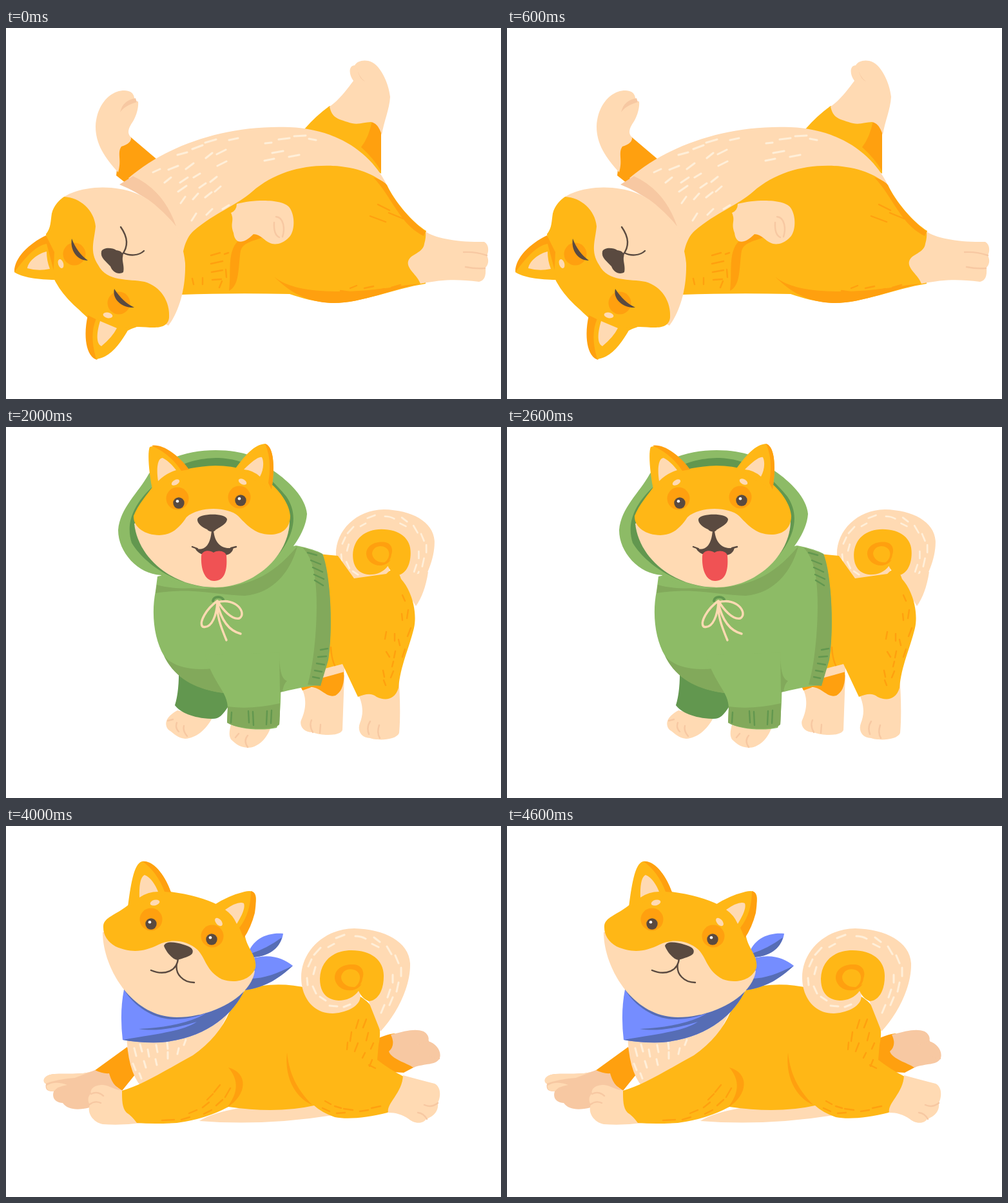
An HTML page for the animation above (5000 ms loop, 768x576 px).

```html
<!DOCTYPE html>
<html lang="en">
<head>
<meta charset="utf-8">
<title>Shiba stickers</title>
<style>
html,body{margin:0;width:100%;height:100%;overflow:hidden;background:#fff}
svg{display:block;width:100vw;height:100vh}
.y{fill:#ffb716}.o{fill:#ffa00f}.c{fill:#ffdab3}.p{fill:#f7c8a2}.d{fill:#5a4a40}
.g{fill:#8dbb66}.m{fill:#82a95b}.k{fill:#62974f}
.r{fill:#f05254}.l{fill:#ff5a5a}.n{fill:#cc4648}
.b{fill:#758dff}.v{fill:#566db5}
.s{fill:none;stroke-width:2.4;stroke-linecap:round;stroke-linejoin:round}
.so{stroke:#ffa00f}.sw{stroke:#ffefd9;stroke-width:3}.sd{stroke:#5a4a40}.sp{stroke:#f7c8a2}.sk{stroke:#62974f}.sn{stroke:#cc4648}.sc{stroke:#ffdab3}
</style>
</head>
<body>
<svg viewBox="0 0 768 576">
<defs>
<circle id="blush" class="o" r="17.5"/>
<ellipse id="brow" class="c" rx="7.5" ry="4.3"/>
<g id="eye"><circle class="d" r="8.7"/><circle cx="-2" cy="-2.8" r="2.3" fill="#fff"/></g>
<g id="tail">
<path class="c" d="M581 319C606 292 628 250 627 213C625 180 588 160 540 159C492 160 457 196 458 237C459 270 480 292 508 291C536 289 556 274 548 257L562 271Z"/>
<path class="y" d="M547 256C540 266 528 271 516 271C497 270 487 258 487 237C488 209 508 193 536 193C567 193 587 209 586 234C586 255 577 271 563 272C555 269 550 263 547 256"/>
<path class="o" d="M552 245C541 263 512 256 510 236C510 221 524 214 540 215C552 216 557 226 553 237C552 245 547 251 540 253Z"/>
<path class="y" d="M541 250C530 251 520 244 520 234C522 223 534 219 544 225C553 232 549 245 541 250"/>
<path class="s sw" d="M512 174l13-5M542 171q9 0 16 4M488 189l-10 11M509 183l-9 5M474 207l-5 11M480 219l-3 11M467 236l1 11M476 249l5 11M487 265l9 6M502 279l12 1M524 281l10-4M571 173l9 7M568 183l10 5M591 187l7 12M604 201l5 12M613 220l0 13M600 231l0 12M609 243l-3 14M596 254l-4 12M600 266l-5 12M587 278l-5 12"/>
</g>
</defs>

<g class="pose">
<path class="y" d="M463 157Q480 137 502 121L540 130L582 152V226Q520 195 463 157"/>
<path class="o" d="M568 144L582 150V222Q570 202 551 185Q563 170 568 144"/>
<path class="c" d="M502 122C517 112 530 94 539 82C531 71 532 58 541 58C544 52 553 49 562 51C580 54 594 86 596 107C595 126 586 146 583 166Q577 147 566 146C555 146 545 152 530 146C515 141 506 140 502 122"/>
<path class="p" d="M544 59Q546 75 557 83Q547 79 544 59"/>
<path class="o" d="M193 169L233 203L190 244L171 229L176 184Z"/>
<path class="c" d="M194 170C187 163 190 155 197 145C203 135 206 122 205 114Q199 114 199 108C197 97 185 95 172 99C155 105 140 125 139 153C139 180 153 201 174 224C180 205 172 194 179 184Q195 179 194 170"/>
<path class="p" d="M201 109C188 111 180 118 177 131Q183 121 203 115Z"/>
<path class="c" d="M190 233C250 182 340 150 440 154C516 157 568 196 591 244L400 320L260 350L215 260Z"/>
<path class="p" d="M176 243L197 230Q245 252 264 308Q230 265 176 243"/>
<path class="y" d="M272 414C269 365 274 330 291 315C325 286 357 276 382 254C420 221 470 210 520 215C557 219 580 234 591 244C605 272 631 302 652 315L651 397C600 405 550 428 505 427C480 425 460 420 440 413Q350 411 272 414"/>
<path class="o" d="M570 232Q586 237 591 244C602 270 630 301 651 316L648 323C610 304 600 264 570 232M416 386C438 405 480 410 530 409C580 407 610 400 642 397C600 405 550 428 505 427C465 425 440 410 416 386M346 408C349 382 345 360 352 343C360 322 384 315 400 324C385 331 368 332 364 346C360 370 363 400 346 408"/>
<path class="c" d="M651 316C665 326 700 333 742 332C750 336 749 349 746 353C750 361 748 368 744 372C745 386 742 392 734 394C700 390 680 390 643 397C638 383 621 374 624 362C628 350 647 350 649 335Q652 325 651 316"/>
<path class="s sp" d="M746 353Q728 347 710 348M743 373Q728 374 713 371"/>
<path class="c" d="M358 273C385 266 430 265 440 279C449 292 448 315 440 324C428 338 414 336 410 334C400 330 395 320 384 320C367 337 355 335 353 318C347 302 355 300 349 287Q358 283 358 273"/>
<path class="s sp" d="M419 293C431 294 433 312 429 324M416 302Q415 321 424 325"/>
<path class="s so" d="M318 353l14-4M318 366l18-4M319 379l17-3M320 391l14-1M289 389l2 9M305 388l0 10M339 351l6-2M341 375l1 12M335 393l-4 10M565 292l24 9M577 274l18 9M594 287l22 9M544 400l-10 4M570 401l-14 3M533 410l-14-2M558 410l-15 2M587 405l-15 5M612 399l-14 4"/>
<path class="s sw" d="M266 197l15-4M289 188l16-6M309 178l17-5M346 174l14-3M252 220l15-6M279 219l12-9M310 202l10-8M327 196l14-7M228 224l11-5M246 240l10-8M270 240l12-8M291 232l10-6M328 214l14-7M267 254l13-9M300 248l10-7M317 239l10-8M271 272l7-10M290 266l8-9M309 263l10-8M324 254l9-8M288 299l7-11M311 290l9-9M336 281l10-6M401 206l15-3M413 194l17-3M423 173l17-2M447 168l18-1M402 179l10-1M439 200l16-3M470 172l11 2"/>
<path class="c" d="M90 262C125 241 185 243 220 266C255 290 275 330 278 365C279 406 268 440 252 462L170 420L110 330Z"/>
<path class="y" d="M62 320C70 310 69 300 71 288C74 275 83 267 90 262C115 263 137 283 139 308C137 330 129 347 143 368C157 395 190 389 215 394C240 401 255 425 253 450C250 472 220 463 203 464C186 470 170 479 170 479C146 468 124 448 114 438Q75 405 66 366Z"/>
<path class="o" d="M62 322C35 335 12 358 13 379L73 391L75 348ZM127 446C120 475 123 510 141 515L178 471Z"/>
<path class="y" d="M13 379C27 361 43 339 63 335L78 391C50 391 24 387 13 379M140 514C133 490 132 470 140 451L191 466C177 491 161 512 140 514"/>
<path class="c" d="M63 347C50 350 35 361 33 373Q50 378 68 374Q63 361 63 347M146 455C140 475 140 490 148 494Q165 480 172 466Z"/>
<use href="#blush" x="106" y="351"/><use href="#blush" x="175" y="427"/>
<path class="d" d="M102 327C99 345 110 361 127 361C115 352 108 342 102 327M168 405C164 421 180 435 199 434C187 428 177 419 168 405M148 347C151 340 165 341 171 345C179 346 183 350 181 356C180 362 184 371 182 379C175 384 165 379 162 370C155 362 146 357 148 347"/>
<path class="s sd" d="M180 352Q195 333 178 309M182 349C191 354 206 354 214 346"/>
<use href="#brow" transform="translate(85 366)rotate(72)scale(.95)"/><use href="#brow" transform="translate(158 446)rotate(12)"/>
</g>

<g class="pose">
<path class="c" d="M622 346C612 390 580 420 545 430L550 395Q600 375 622 346"/>
<path class="y" d="M441 262C470 210 500 155 547 140L655 148C690 172 716 208 718 255C718 310 712 360 706 395Q665 410 645 391L614 346C597 374 576 385 555 393C560 430 530 475 510 488Q470 485 424 481L445 420Z"/>
<path class="o" d="M459 296Q489 299 495 318C499 362 490 390 468 408L487 340ZM607 236C594 265 599 322 614 347C602 312 602 270 607 236M540 348C560 357 567 379 558 395C556 374 552 363 540 348"/>
<path class="c" d="M645 391C660 377 680 395 694 396Q703 388 707 368L704 445C700 453 678 455 667 452C655 450 645 442 646 434C650 415 650 405 645 391M424 481C450 495 490 467 511 487C480 515 440 540 410 551C400 553 390 550 390 545C380 548 370 545 372 538C360 538 355 530 360 522C365 512 380 510 400 507Q412 492 424 481"/>
<path class="y" d="M266 465Q285 452 296 443L390 470Q360 488 325 498Z"/>
<path class="c" d="M266 463C275 476 290 490 310 487Q325 485 327 497C300 510 265 518 240 521C228 520 225 513 228 510C215 514 207 508 210 503C196 502 193 490 200 484C212 478 225 480 240 476Q255 467 266 463"/>
<path class="s sp" d="M228 510Q234 499 243 497M210 503Q215 490 225 487M372 538Q378 524 388 520M391 545Q397 525 412 517M659 442Q657 432 662 424M674 452Q669 443 674 434"/>
<path class="s so" d="M517 187l10-10M534 170l9-10M487 208l8-10M500 212l8-11M471 223l8-10M460 242l5-8M544 173l8-6M546 152l11-5M688 205l6 11M698 211l4 10M689 234l6 7M700 246l4 9M690 262l6 8M690 290l3 8M703 315l-2 12M688 322l2 11M699 345l-4 14M690 373l5-9M546 385l-7 10M546 408l-5 12M532 402l-6 10M524 420l-8 11M534 442l-8 12M517 444l-8 11M500 440l-9 7M500 460l-10 7M480 465l-9 5M513 470l-9 7M340 464l-13-2M320 475l-14 0M355 476l-14 4"/>
<use href="#tail" transform="translate(108 -112)scale(.988)"/>
<path class="c" d="M243 385C250 432 300 466 380 471C440 473 488 400 489 332L350 320Z"/>
<path class="y" d="M243 385C245 368 255 357 258 345C270 320 285 300 301 291Q340 275 378 269Q410 262 440 278C470 290 487 305 488 330C480 360 460 362 440 361C420 360 405 344 385 341C350 337 340 355 325 380C305 410 285 412 265 408C250 405 242 396 243 385"/>
<path class="y" d="M236 280C237 268 255 267 268 272Q286 278 302 291L259 347C251 320 237 300 236 280M375 271C385 245 400 218 414 217C430 218 440 245 442 281Z"/>
<path class="o" d="M417 218C432 221 442 249 443 281L432 277Q434 245 417 218"/>
<path class="c" d="M267 324Q251 300 254 290C260 284 275 293 288 301Q275 310 267 324M393 267C400 246 408 236 414 240Q421 250 422 270Q405 262 393 267"/>
<use href="#blush" x="303" y="342"/><use href="#blush" x="400" y="312"/>
<path class="y" d="M282 365Q300 348 326 345L328 375H282ZM378 329Q398 317 423 320L423 336H378Z"/>
<path class="d" d="M288 362C291 345 311 339 326 345C310 347 300 351 288 362M382 327C390 310 411 307 422 320C405 318 395 320 382 327M343 364C343 355 365 348 378 348C392 348 390 360 385 366C376 374 370 379 362 375C350 375 343 370 343 364M334 410C350 414 371 404 373 372L376 372C375 400 410 402 424 383C430 405 420 425 408 434C390 442 370 441 355 432Q340 424 334 410"/>
<path class="r" d="M364 437C368 424 380 419 388 426C395 415 412 413 424 418C415 438 385 444 364 437"/>
<use href="#brow" transform="translate(293 319)rotate(-50)"/><use href="#brow" transform="translate(395 286)rotate(8)"/>
</g>

<g class="pose">
<path class="c" d="M457 403C470 410 500 400 525 385L522 470C520 480 490 480 476 474C460 474 455 462 458 455C465 440 468 420 457 403M543 408L609 385Q613 440 610 475C605 487 575 487 565 483C550 483 545 470 549 460C555 445 555 430 543 408"/>
<path class="o" d="M457 403L490 388L524 378C526 400 520 412 511 417C497 421 490 405 474 404L460 409"/>
<path class="c" d="M490 376L525 365V380L485 391Z"/>
<use href="#tail" transform="translate(97.4 -16)scale(.905)"/>
<path class="c" d="M608 234L655 225Q650 258 636 278Z"/>
<path class="y" d="M485 197L515 200L540 235L590 228Q605 212 613 236C631 256 638 290 633 312C625 345 612 370 609 405C603 425 587 425 575 419C566 412 557 415 546 419L522 368L495 375Z"/>
<use href="#tail" transform="translate(97.4 -16)scale(.905)" clip-path="path('M440 140H640V240L562 272L546 300H440Z')"/>
<path class="s so" d="M504 342Q505 360 510 370M615 261l4 9M624 284l-2 13M614 290l1 10M590 318l-2 11M603 321l0 11M628 312l-5 13M590 349l5 8M604 348l-2 10M619 345l-4 12M601 364l-2 8M585 378l2 10M601 379l-4 10M586 393l3 8M609 330l2 9"/>
<path class="c" d="M266 440L320 452C310 470 295 483 278 484C265 483 260 475 252 470C245 462 247 450 266 440M349 462L411 465C405 485 390 498 375 498C360 497 355 490 349 485C345 478 347 470 349 462"/>
<path class="s sp" d="M251 456l8-2M268 473Q262 467 265 459M281 480Q274 472 276 464M356 482l5-6M375 497Q368 487 375 479M476 474Q470 464 474 455M487 475l1-13M563 477Q559 466 565 457M580 483Q575 475 579 463"/>
<path class="k" d="M268 372L330 390L346 432C335 449 330 454 318 453C290 452 270 443 262 432Q269 410 268 372"/>
<path class="g" d="M235 232L380 200L450 184Q480 190 491 197C502 230 508 300 500 360L487 401Q470 401 430 411L338 413C300 408 262 392 245 355C230 330 225 290 232 255Z"/>
<path class="m" d="M460 187L491 197C503 225 508 310 500 362L488 402L468 400C480 360 485 280 480 240Q477 205 460 187M245 355C260 374 290 378 320 375L338 413C300 408 265 395 245 355"/>
<path class="g" d="M309 354C322 400 344 410 344 437L343 459C360 470 400 472 420 467C428 455 428 380 423 350Z"/>
<path class="m" d="M424 349C424 375 427 392 436 394Q430 400 429 411L425 412ZM344 434Q380 439 425 429C425 445 425 455 424 462C415 472 360 470 343 459Z"/>
<path class="s sk" d="M376 441l1 18M383 442l1 21M405 441l-1 21M412 440l-1 20M350 443l-1 16M468 195l14 4M473 207l15 6M476 218l15 7M478 229l15 7M479 238l13 8M488 346l11-2M484 357l13-1M482 367l12 2M479 378l11 2M476 388l10 2"/>
<path class="m" d="M234 245C270 255 300 248 325 250C370 247 410 236 452 185C440 230 410 259 370 262C320 260 290 249 232 258"/>
<path class="g" d="M222 72C250 45 290 36 325 36C370 36 395 48 415 68C440 85 465 110 467 135C465 165 440 195 420 215C395 235 365 247 325 249C290 256 260 244 240 230C205 228 174 195 174 160C177 125 205 103 222 72"/>
<path class="k" d="M228 92C260 55 300 48 330 48C370 50 400 65 435 108C450 130 449 155 435 180C415 215 385 235 325 249C270 249 217 216 195 180C187 155 192 125 228 92"/>
<path class="c" d="M199 150C205 205 260 249 325 249C385 249 440 200 440 145L320 100Z"/>
<path class="y" d="M198 138C205 120 219 105 228 92Q260 62 325 60Q375 60 411 88C425 100 440 120 441 138C441 160 425 167 410 167C385 167 372 150 360 138C345 124 300 122 280 140C270 155 258 168 238 168C215 168 197 155 198 138"/>
<path class="y" d="M228 101C222 75 219 40 223 31C238 25 270 45 283 66ZM355 66C370 45 385 27 402 26C415 30 418 60 412 97Z"/>
<path class="o" d="M226 29C244 25 271 47 284 66L272 68Q255 42 226 29M402 26C415 30 418 60 412 97L407 87Q413 50 402 26"/>
<path class="c" d="M236 84C233 65 235 48 243 48C252 52 260 62 264 67Q248 72 236 84M369 66C380 55 392 45 397 47C401 55 399 68 394 77Q383 67 369 66"/>
<use href="#blush" x="266" y="111"/><use href="#blush" x="362" y="109"/><use href="#eye" x="268" y="118"/><use href="#eye" x="364" y="114"/>
<use href="#brow" transform="translate(263 86)rotate(-30)scale(.9)"/><use href="#brow" transform="translate(367 85)rotate(28)scale(.9)"/>
<path class="d" d="M297 143C300 134 340 133 343 143C343 151 330 156 325 160C322 164 315 163 312 159C305 156 296 150 297 143M293 188C303 192 317 190 319 160L322 160C324 188 343 190 353 187C351 199 340 200 330 200L308 199Q297 196 293 188"/>
<path class="s sd" d="M289 186l8 3M357 186l-8 2"/>
<path class="r" d="M303 200C304 192 315 190 322 195C330 190 341 193 342 200C344 225 338 239 323 239C308 239 302 220 303 200"/>
<path class="s sk" style="stroke-width:4" d="M321 270C322 262 336 262 338 270"/>
<path class="s sc" style="stroke-width:3.4" d="M328 272C358 264 374 290 362 297C350 300 336 283 328 270C311 282 299 303 305 310C320 314 327 290 328 271C326 295 336 316 342 331M328 274C334 300 345 316 364 321"/>
</g>

<g class="pose">
<path class="p" d="M103 380C80 375 52 378 45 385C38 400 27 412 26 420C26 430 35 435 45 432C60 430 70 430 76 433L110 412Z"/>
<path class="o" d="M92 378L118 379L130 420L88 442L72 433C85 420 107 412 104 400Q99 386 92 378M506 322Q525 315 540 309L565 360Q535 380 506 391Z"/>
<path class="y" d="M125 325L165 320L205 288Q240 276 290 268L295 486Q250 487 218 484C195 500 160 499 119 499L90 455Q95 440 125 420C115 390 110 350 125 325"/>
<path class="o" d="M262 400C256 440 238 468 218 484L292 485L286 470C260 473 245 470 237 469C253 445 262 420 262 400"/>
<path class="o" d="M119 383Q116 408 126 415L122 426L113 400Z"/>
<path class="c" d="M95 441C80 455 50 465 40 472C35 480 38 490 42 497C38 505 42 515 52 516C60 525 75 523 83 515C95 503 108 500 119 498C122 480 105 470 93 463C90 455 92 448 95 441"/>
<path class="s sp" d="M42 498Q48 491 55 490M54 516Q57 503 64 499M73 519Q76 510 72 503"/>
<path class="s so" d="M127 357l-4 9M139 352l-5 16M129 377l-4 12M141 381l-4 14M157 380l-2 12M129 401l2 9M143 404l4 9M133 424l-2 10M151 425l-1 12M211 461l-13 6M237 461l-11 9M223 471l-13 9M206 477l-10 8M178 489l-14-2M153 493l-8 0M237 447l-8 5"/>
<use href="#tail" transform="translate(681 48)scale(-1 1)"/>
<path class="p" d="M532 309C550 310 560 295 565 285C575 270 590 258 600 260C610 262 610 270 606 275C615 278 620 288 617 295C615 302 612 303 613 310C610 325 575 340 562 358C550 350 531 345 530 335Q540 325 532 309"/>
<path class="c" d="M565 290C575 270 590 258 600 260C610 262 610 270 606 275Q584 278 568 295ZM577 297Q594 281 612 281C622 289 617 296 612 299Q595 291 577 297"/>
<path class="r" d="M279 270L320 265L497 285C510 320 512 360 510 401L430 474Q370 499 290 492C262 440 250 360 279 270"/>
<path class="n" d="M262 383C285 410 310 434 345 434L410 472C380 495 330 495 290 492Q268 450 262 383M300 277C280 300 269 340 277 400L280 408C277 350 285 310 300 277M510 375C501 390 482 393 463 387L510 402ZM418 320C455 320 480 310 497 288L500 293C485 318 455 330 418 320M433 332Q475 340 501 305Q485 345 433 332"/>
<path class="y" d="M462 388L525 404C531 430 521 450 511 458Q470 468 405 472L420 420Z"/>
<path class="o" d="M436 411L433 440L440 468L406 472Q410 440 436 411"/>
<path class="l" d="M315 365C318 335 345 322 365 322C400 325 440 360 472 385Q445 388 430 410C415 435 410 455 407 473L395 472C370 465 330 430 320 405Q314 385 315 365"/>
<path class="n" d="M314 362C316 400 345 435 382 467C345 450 306 410 314 362M436 398Q399 425 382 469L388 471Q400 428 436 398M467 386Q414 405 394 471L407 473Q415 410 467 386"/>
<path class="l" d="M456 389Q417 417 401 471L407 473Q417 411 456 389"/>
<path class="c" d="M524 404C540 402 548 390 558 392C566 390 566 400 564 402C575 402 580 412 577 420C580 430 572 435 568 438C560 452 535 458 510 458C510 440 530 430 526 418Z"/>
<path class="s sp" d="M564 402Q553 402 549 408M577 420Q566 419 558 422"/>
<path class="s so" d="M440 440l12-6M456 437l13 2M476 438l13-2M495 436l8-3M440 451l13-2M460 455l14-3M480 454l12-2M446 462l11-3M495 449l9-3"/>
<path class="c" d="M310 264C330 300 370 318 415 318C480 318 535 260 535 175L430 160Z"/>
<path class="y" d="M302 245C305 230 312 222 313 210Q315 180 325 165Q345 153 380 137Q430 119 465 122Q490 130 497 143C520 150 534 160 534 178C525 205 500 210 480 209C455 205 445 195 420 193C390 199 385 210 378 230C370 255 355 268 335 268C315 266 302 257 302 245"/>
<path class="y" d="M294 160C290 130 305 128 320 134Q345 140 362 150L320 198Q300 185 294 160M424 124C432 98 448 72 465 72C480 75 485 110 492 139Z"/>
<path class="o" d="M296 137C290 150 297 175 315 200L321 188Q300 165 296 137M424 124C432 98 448 72 462 72Q446 92 441 122Z"/>
<path class="c" d="M318 177Q307 155 311 147C318 145 330 150 343 158Q327 163 318 177M445 122C448 105 455 93 462 94C468 98 472 115 473 128Q458 118 445 122"/>
<use href="#blush" x="364" y="196"/><use href="#blush" x="457" y="164"/>
<path class="y" d="M441 179Q460 167 480 168V186H441Z"/>
<use href="#eye" x="366" y="201"/>
<path class="d" d="M443 177C446 161 468 156 480 168C465 168 456 171 452 176L468 179Q455 181 443 178M398 217C400 205 428 198 438 201C443 208 440 215 434 219C428 226 420 226 415 229C405 231 396 225 398 217M403 258C430 257 455 245 466 222C470 250 460 275 435 276C420 277 408 268 403 258"/>
<path class="r" d="M433 274C430 262 442 256 453 262C460 252 465 250 472 256C482 262 488 272 486 280C483 289 470 288 463 280C455 274 445 277 433 274"/>
<path class="s sn" d="M455 264q11 2 14 8"/>
<use href="#brow" transform="translate(353 174)rotate(-50)scale(.9)"/><use href="#brow" transform="translate(451 138)rotate(8)"/>
</g>

<g class="pose">
<path class="o" d="M560 337Q590 323 603 322L634 374L617 383L560 380ZM137 380L188 343L205 380L180 411Z"/>
<path class="p" d="M597 324C620 318 635 314 648 319C655 323 657 330 655 334C668 338 676 350 673 360C668 372 650 368 632 375C620 367 598 362 594 350Q605 340 597 324M138 379C120 387 100 384 75 385C60 386 55 395 62 400C60 410 65 412 74 412C70 425 80 430 88 430C95 440 110 442 130 437L181 411C168 405 163 395 160 384Q150 385 138 379"/>
<path class="c" d="M138 379C120 387 100 384 75 385C60 386 55 395 61 400Q80 393 107 391ZM63 403Q76 395 95 402Q80 404 74 412Q62 412 63 403"/>
<path class="c" d="M187 320L355 270L310 360L210 405Q188 380 187 320M300 458Q340 432 480 428L507 449Q400 466 300 458"/>
<path class="c" d="M195 410C165 413 165 402 147 402C135 403 130 410 132 415C126 420 127 428 130 433C125 445 135 460 150 463Q180 465 210 461Z"/>
<path class="y" d="M347 288Q360 270 372 253Q420 240 470 252L550 265C575 280 585 310 578 340L576 363Q595 378 617 389C615 425 605 435 592 445C560 453 530 456 510 452Q490 445 478 434Q420 447 345 436Q310 455 265 461Q230 463 203 461Q195 450 187 445C180 438 180 425 180 411C210 403 250 378 290 356Q330 328 347 288"/>
<path class="o" d="M345 375C376 383 375 417 343 437C360 415 362 395 345 375M436 352C440 390 455 412 475 433C445 420 432 385 436 352"/>
<path class="c" d="M616 387Q645 395 665 400C675 405 675 420 670 430C672 445 660 452 652 455C645 465 630 460 625 455C615 448 605 445 593 445C590 430 615 415 616 387"/>
<path class="s sp" d="M132 416Q142 411 151 419M130 432Q138 426 147 430M670 430Q660 438 649 433M653 455Q648 446 639 445M655 334l-15 5M672 361q-9 1-15-5"/>
<path class="s so" d="M547 301l-4 13M559 300l-5 13M536 320l-2 14M562 321l-3 12M530 336l-1 11M546 337l-5 13M557 352l-4 8M570 337l-4 9M568 363l-4 10M573 376l-10-5M332 402l-9 11M348 407l-8 14M321 416l-9 9M336 425l-10 9M315 429l-10 8M296 441l-12 5M319 441l-12 6M285 452l-13 4M261 456l-19 1M495 427l9 5M510 435l10 3M491 438l11 5M513 446l13-1M538 441l-14-2M562 441l-13 2M581 435l-14 3"/>
<path class="s sw" d="M199 345l3 12M208 339l3 11M220 347l2 11M233 340l2 11M250 336l1 10M214 365l3 10M232 362l2 9M251 351l0 10M268 345l-2 9M197 369l4 10M207 384l3 8M279 332l-3 8"/>
<use href="#tail"/>
<path class="b" d="M374 202C382 175 405 165 430 167C428 185 410 203 382 204ZM380 206C410 197 430 205 445 217C425 235 405 250 370 255Z"/>
<path class="v" d="M380 198Q405 190 428 173C424 190 408 203 380 204ZM378 237C402 237 422 228 445 217C425 235 405 250 370 255Z"/>
<path class="b" d="M183 254L260 240L372 250C355 292 310 330 240 336Q205 337 181 332Q176 290 183 254"/>
<path class="v" d="M181 332C240 322 275 318 296 304C250 318 225 318 206 315C260 313 300 300 315 287Q350 274 372 250C355 292 310 330 240 336Q205 337 181 332M183 254C200 282 232 301 262 300C300 300 345 280 372 250L260 240Z"/>
<path class="c" d="M150 165C150 220 195 297 265 297C320 297 380 265 386 225L250 140Z"/>
<path class="y" d="M151 155C152 142 170 138 188 124Q215 100 255 102Q300 108 330 123Q360 140 370 165C372 190 390 200 387 220C380 240 355 245 335 238C310 225 310 205 297 192C280 177 256 175 237 184C215 195 195 198 170 187Q150 175 151 155"/>
<path class="y" d="M189 126C193 95 198 58 211 55C230 52 248 80 256 103ZM322 123Q345 108 370 102C385 98 390 105 387 120C385 145 375 160 368 174Z"/>
<path class="o" d="M212 55C232 55 248 80 256 103L246 102Q235 72 212 55M380 101C390 103 388 120 386 135Q380 158 369 174L362 158Q380 135 380 101"/>
<path class="c" d="M207 111Q206 80 215 76C225 80 232 92 236 102Q220 102 207 111M340 130Q360 116 369 120C372 128 364 142 358 152Q352 138 340 130"/>
<use href="#blush" x="225" y="145"/><use href="#blush" x="320" y="171"/><use href="#eye" x="225" y="152"/><use href="#eye" x="319" y="176"/>
<use href="#brow" transform="translate(231 119)rotate(-15)"/><use href="#brow" transform="translate(330 149)rotate(48)"/>
<path class="d" d="M245 186C248 178 262 180 275 184C290 188 291 193 289 198C285 203 275 205 266 208C258 207 248 195 245 186"/>
<path class="s sd" d="M225 224C246 233 266 225 267 205M265 214C262 230 275 243 292 243"/>
</g>
</svg>
<script>
const HOLD = 1000;
const poses = [...document.querySelectorAll('.pose')];
const start = performance.now();

function draw(time) {
  const current = Math.floor(time / HOLD) % poses.length;
  poses.forEach((pose, i) => { pose.style.display = i === current ? '' : 'none'; });
}

function tick() {
  draw(performance.now() - start);
  requestAnimationFrame(tick);
}
tick();
</script>
</body>
</html>
```
